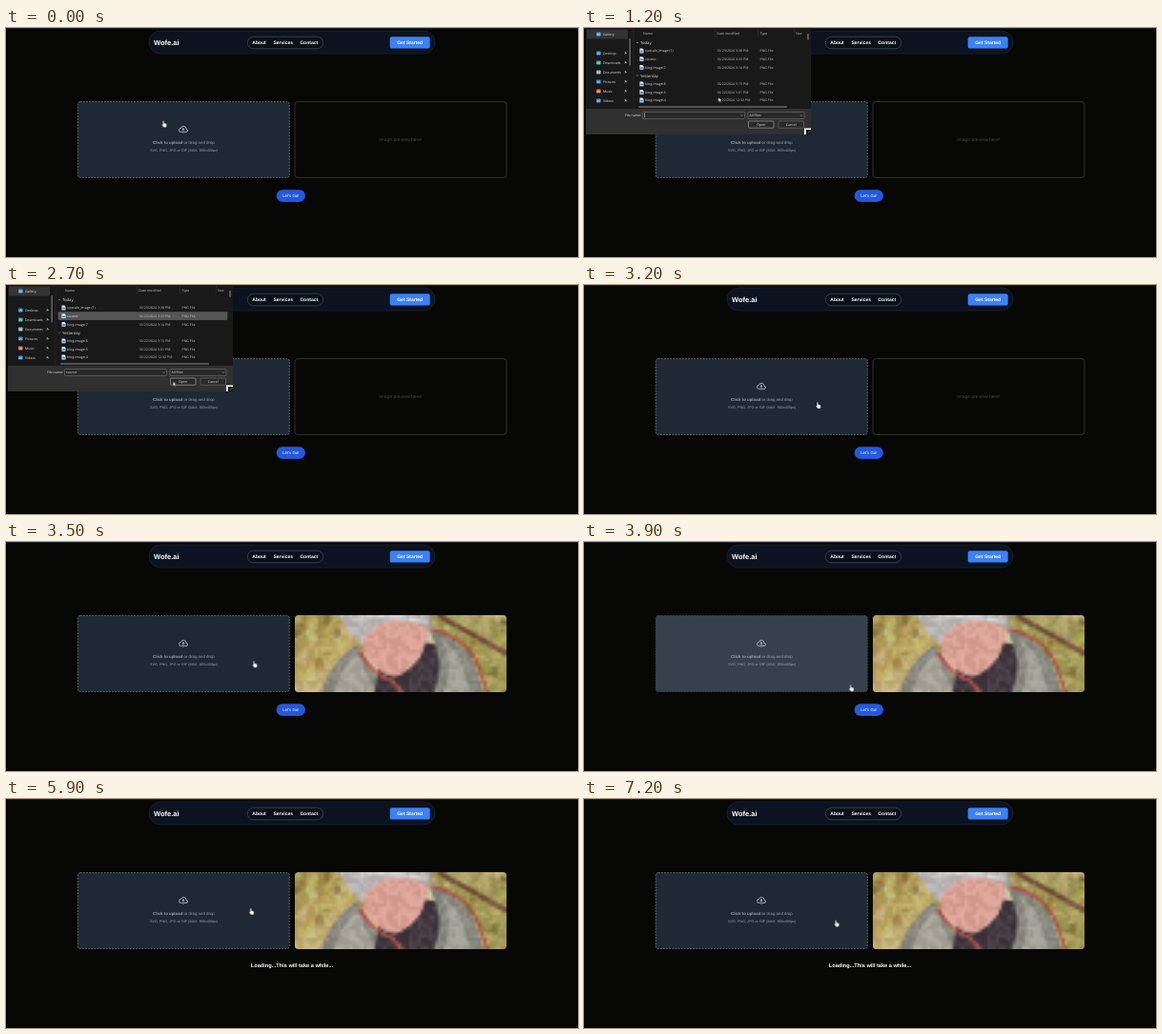
An HTML page with a canvas for the animation above (8000 ms loop, 600 by 241 pixels).

```html
<!DOCTYPE html>
<html lang="en">
<head>
<meta charset="utf-8">
<title>Image upload</title>
<style>
html, body { margin: 0; width: 100%; height: 100%; overflow: hidden; background: #070705; }
#stage { position: relative; width: 600px; height: 241px; overflow: hidden; }
svg { position: absolute; inset: 0; display: block; }
text { text-rendering: geometricPrecision; font-family: "Liberation Sans", Arial, sans-serif; white-space: pre; }
.b { font-weight: 700; }
.mid { text-anchor: middle; }
#dialog text { font: 3.55px "Open Sans", "Noto Sans", sans-serif; fill: #e4e4e4; }
#dialog .group { font-size: 4.2px; }
#dialog .dim { fill: #c4c4c4; }
#photo { position: absolute; left: 302.7px; top: 77.4px; width: 222.4px; height: 80.2px; border-radius: 3.5px; }

/* Hard state changes over the 8 s loop */
#zone, #preview, #photo, #dialog, #hover1, #hover2, .picked, #caret, #go, #goBox, #loading, #hand, #arrow, #beam {
  animation: 8s step-end infinite;
}
#zone { animation-name: zone; }
#preview { animation-name: preview; }
#photo { animation-name: photo; }
#dialog { animation-name: dialog; }
#hover1 { animation-name: hover1; }
#hover2 { animation-name: hover2; }
.picked { animation-name: picked; }
#caret { animation-name: caret; }
#go { animation-name: go; }
#goBox { animation-name: press; }
#loading { animation-name: loading; }
#hand { animation-name: hand; }
#arrow { animation-name: arrow; }
#beam { animation-name: beam; }
#pointer { animation: move 8s linear infinite; }

@keyframes zone {
  0%, 67.5%, 100% { fill: #1f2935; stroke: #87919c; }
  48.75% { fill: #37414e; stroke: #4d5866; }
}
@keyframes preview { 0% { visibility: visible } 41.25%, 100% { visibility: hidden } }
@keyframes photo { 0% { visibility: hidden } 41.25%, 100% { visibility: visible } }
@keyframes dialog { 0%, 40%, 100% { visibility: hidden } 12.5% { visibility: visible } }
@keyframes hover1 { 0%, 25%, 100% { opacity: 0 } 18.75% { opacity: 1 } }
@keyframes hover2 { 0%, 27.5%, 100% { opacity: 0 } 25% { opacity: 1 } }
@keyframes picked { 0%, 40%, 100% { opacity: 0 } 27.5% { opacity: 1 } }
@keyframes caret { 0% { opacity: 1 } 27.5%, 100% { opacity: 0 } }
@keyframes go { 0% { visibility: visible } 57.5%, 100% { visibility: hidden } }
@keyframes press { 0%, 55%, 100% { fill: #2459dc } 51.25% { fill: #1d4ed0 } }
@keyframes loading { 0% { visibility: hidden } 57.5%, 100% { visibility: visible } }
@keyframes hand { 0%, 40%, 67.5%, 100% { visibility: visible } 12.5%, 57.5% { visibility: hidden } }
@keyframes arrow { 0%, 40%, 67.5%, 100% { visibility: hidden } 12.5%, 63.75% { visibility: visible } }
@keyframes beam { 0%, 63.75%, 100% { visibility: hidden } 60% { visibility: visible } }
@keyframes move {
  0%, 12.5% { transform: translate(165.2px, 97.5px); }
  20%, 22.5% { transform: translate(93.5px, 24.5px); }
  26.25%, 30% { transform: translate(88px, 31px); }
  33.75%, 36.25% { transform: translate(175.3px, 101.5px); }
  40% { transform: translate(245px, 123px); }
  43.75%, 46.25% { transform: translate(260.2px, 125.2px); }
  51.25%, 57.5% { transform: translate(299px, 175px); }
  60%, 62.5% { transform: translate(303.5px, 173px); }
  65% { transform: translate(298px, 158px); }
  67.5% { transform: translate(276px, 129px); }
  68.75%, 79.99% { transform: translate(256.8px, 114.8px); }
  80%, 100% { transform: translate(264.3px, 127.4px); }
}
</style>
</head>
<body>
<div id="stage">
  <svg width="600" height="241" viewBox="0 0 600 241">
    <rect width="600" height="241" fill="#070705"/>
    <rect width="600" height="1" fill="#1b232b"/>

    <rect x="150" y="3" width="300" height="24" rx="12" fill="#0b1320" stroke="#1c2838" stroke-width=".7"/>
    <text class="b" x="155" y="17.8" font-size="7.5" fill="#fff">Wofe.ai</text>
    <rect x="253.3" y="9.2" width="79.4" height="12.6" rx="6.3" fill="#0a101a" stroke="#46505e" stroke-width=".7"/>
    <g class="b" font-size="5" fill="#fff">
      <text x="258.3" y="17.2">About</text>
      <text x="280.5" y="17.2">Services</text>
      <text x="308.5" y="17.2">Contact</text>
    </g>
    <rect x="402.7" y="9.2" width="42" height="12.4" rx="2.2" fill="#3b82f6"/>
    <text class="b mid" x="423.7" y="17.2" font-size="5" fill="#fff">Get Started</text>

    <rect id="zone" x="75.3" y="77.6" width="222" height="79.8" rx="2.5" stroke-width=".65" stroke-dasharray="1.875 1.25"/>
    <path transform="translate(181 102.9) scale(.5)" fill="none" stroke="#a6aeb8" stroke-width="2" stroke-linecap="round" stroke-linejoin="round"
      d="M13 13h3a3 3 0 0 0 0-6h-.025A5.56 5.56 0 0 0 16 6.5 5.5 5.5 0 0 0 5.207 5.021C5.137 5.017 5.071 5 5 5a4 4 0 0 0 0 8h2.167M10 15V6m0 0L8 8m2-2 2 2"/>
    <text class="mid" x="186.4" y="122.2" font-size="4.375" fill="#98a0ab"><tspan class="b">Click to upload</tspan> or drag and drop</text>
    <text class="mid" x="186.6" y="129.8" font-size="3.75" fill="#98a0ab">SVG, PNG, JPG or GIF (MAX. 800x400px)</text>

    <g id="preview">
      <rect x="303" y="77.6" width="222" height="79.8" rx="3" fill="none" stroke="#41454a" stroke-width=".7"/>
      <text class="mid" x="413.8" y="118.8" font-size="5" fill="#42464d">Image preview here!</text>
    </g>

    <g id="go">
      <rect id="goBox" x="283.6" y="170.3" width="30.4" height="12.6" rx="6.3"/>
      <text class="mid" x="298.8" y="178.2" font-size="4.375" fill="#fff">Let's Go!</text>
    </g>
    <text id="loading" class="b mid" x="300" y="176.8" font-size="5.625" fill="#fff">Loading...This will take a while...</text>
  </svg>

  <canvas id="photo" width="74" height="27"></canvas>

  <svg width="600" height="241" viewBox="0 0 600 241">
    <g id="dialog">
      <rect x="2" y="-2" width="236" height="114" fill="#191919"/>
      <rect x="3" y="1.5" width="43" height="10" rx="1" fill="#343434"/>
      <rect x="47.6" y="11" width="1" height="28.5" rx=".5" fill="#8b8b8b"/>
      <path d="M52 0V85M137.5 1V10M182.5 1V10M220.5 1V10" stroke="#333" stroke-width=".5"/>
      <g id="side"></g>
      <text x="62" y="7.2" class="dim">Name</text>
      <text x="139.3" y="7.2" class="dim">Date modified</text>
      <text x="184.5" y="7.2" class="dim">Type</text>
      <text x="222" y="7.2" class="dim">Size</text>
      <text x="59" y="17.2" class="group">Today</text>
      <text x="59" y="51.7" class="group">Yesterday</text>
      <path d="M55 15l1 1 1-1M55 49.5l1 1 1-1" fill="none" stroke="#ccc" stroke-width=".5"/>
      <rect id="hover1" x="55" y="20" width="177" height="7.8" fill="#484848"/>
      <rect id="hover2" x="55" y="28.7" width="177" height="7.8" fill="#484848"/>
      <rect class="picked" x="55" y="28.7" width="177" height="7.8" fill="#555" stroke="#777" stroke-width=".4"/>
      <g id="files"></g>
      <rect x="234.5" y="6" width="1" height="6.5" rx=".5" fill="#a0a0a0"/>
      <rect x="57" y="82.5" width="156" height=".9" rx=".4" fill="#8b8b8b"/>
      <rect x="2" y="85" width="236" height="27" fill="#303030"/>
      <text x="43" y="93.4">File name:</text>
      <g fill="#292929" stroke="#808080" stroke-width=".5">
        <rect x="61.5" y="88.5" width="107" height="7" rx=".7"/>
        <rect x="172" y="88.5" width="59" height="7" rx=".7"/>
        <rect x="172.5" y="98" width="26.5" height="7.2" rx="1" stroke="#c8c8c8"/>
        <rect x="204" y="98" width="26.5" height="7.2" rx="1"/>
      </g>
      <path d="M164.5 91.5l1 1 1-1M227 91.5l1 1 1-1" fill="none" stroke="#ccc" stroke-width=".5"/>
      <rect id="caret" x="63" y="89.7" width=".5" height="4.6" fill="#fff"/>
      <text class="picked" x="63" y="93.4">cosmic</text>
      <text x="173.5" y="93.4">All Files</text>
      <text x="185.7" y="102.9" class="mid">Open</text>
      <text x="217.2" y="102.9" class="mid">Cancel</text>
      <path d="M231 105.5H238V107H233V112H231Z" fill="#fff"/>
      <path d="M233 107H238V112H233Z" fill="#111"/>
      <path d="M234.5 111l2.5-2.5" stroke="#aaa" stroke-width=".6"/>
    </g>

    <g id="pointer">
      <path id="hand" fill="#fff" stroke="#111" stroke-width=".35" stroke-linejoin="round"
        d="M-.8 .5Q0 -.5 .6 .5V2.6Q1.2 2.2 1.6 2.9Q2.2 2.5 2.5 3.2Q3.3 3 3.3 4V5.2Q3.1 6.2 2.7 7H0Q-.8 5.6 -1.9 4.2Q-1.9 3.4 -.8 4.2Z"/>
      <path id="arrow" fill="#fff" stroke="#111" stroke-width=".35" d="M0 0V4.7L1.1 3.7 1.9 5.4 2.7 5 1.9 3.4H3.4Z"/>
      <path id="beam" fill="none" stroke="#ddd" stroke-width=".6" d="M-1 0H1M0 0V5.5M-1 5.5H1"/>
    </g>
  </svg>
</div>
<script>
const byId = id => document.getElementById(id);
const label = (x, y, s, c = "") => `<text x="${x}" y="${y}" class="${c}">${s}</text>`;

const places = [
  ["Gallery", 6.5, "#4aa3e8"], ["Desktop", 26.5, "#2f9be0"], ["Downloads", 36.5, "#3bb89a"],
  ["Documents", 46.5, "#8fb4cf"], ["Pictures", 56.5, "#3d8fe0"], ["Music", 66.5, "#e07a45"], ["Videos", 76.5, "#4f8fe8"]
];
byId("side").innerHTML = places.map(([name, y, color], i) =>
  `<rect x="13" y="${y - 2}" width="4.6" height="4" rx=".8" fill="${color}"/>` +
  `<path d="M14 ${y + 1.2}l1.3-1.6 1.3 1.6" fill="none" stroke="#fff" stroke-width=".5"/>` +
  label(20, y + 1.4, name) +
  (i ? `<path d="M42.3 ${y + 1.3}l1-1m-.6-1l1.6 1.6m-1-2.2l1.4 1.4-1 .4-.9-.9z" fill="#aaa" stroke="#aaa" stroke-width=".4"/>` : "")
).join("");

const files = [
  ["upscale_image (1)", 24, "10/23/2024 3:38 PM"], ["cosmic", 32.7, "10/23/2024 3:33 PM"],
  ["blog-image-7", 41.4, "10/23/2024 3:14 PM"], ["blog-image-6", 58.8, "10/22/2024 5:15 PM"],
  ["blog-image-5", 67.4, "10/22/2024 5:01 PM"], ["blog-image-4", 76, "10/22/2024 12:32 PM"]
];
byId("files").innerHTML = files.map(([name, y, date]) =>
  `<path d="M58.5 ${y - 2.4}h2.8l1.2 1.2v3.6h-4z" fill="#e8edf2"/>` +
  `<rect x="59.2" y="${y - .4}" width="2.6" height="1.9" fill="#3f86cc"/>` +
  label(64.3, y + 1.2, name) + label(139.3, y + 1.2, date, "dim") + label(184.5, y + 1.2, "PNG File", "dim")
).join("");

// Soft low-resolution photo: autumn backdrop, faceless figure in hat and fur collar
const photo = byId("photo"), ctx = photo.getContext("2d");
let seed = 7;
const rnd = () => (seed = seed * 16807 % 2147483647) / 2147483647;
const shape = (color, d) => { ctx.fillStyle = color; ctx.fill(new Path2D(d)); };
const line = (color, width, d) => {
  ctx.strokeStyle = color;
  ctx.lineWidth = width;
  ctx.stroke(new Path2D(d));
};
ctx.scale(photo.width / 222, photo.height / 80);

const back = ctx.createLinearGradient(0, 0, 60, 80);
back.addColorStop(0, "#a08a45");
back.addColorStop(.5, "#c0a95f");
back.addColorStop(1, "#d3c4a0");
ctx.fillStyle = back;
ctx.fillRect(0, 0, 222, 80);
shape("#a39a55", "M138 0H222V80H180Z");
for (let i = 0; i < 170; i++) {
  const x = rnd() * 222, y = rnd() * 80, r = 2 + rnd() * 4;
  ctx.fillStyle = `hsl(${32 + rnd() * 32} 42% ${28 + rnd() * 45}% / .55)`;
  ctx.beginPath();
  ctx.ellipse(x, y, r * 1.4, r, rnd() * 3, 0, 7);
  ctx.fill();
}
line("#76503b", 5, "M150 0L222 40");
shape("#8b897f", "M28 80Q36 50 64 30L74 44L96 80Z");
shape("#aaa69a", "M42 80Q46 56 66 40L84 80Z");
shape("#40353d", "M84 80L88 54L136 28L166 34L182 80Z");
shape("#8a897f", "M146 80Q160 48 140 14Q172 22 188 48L198 80Z");
shape("#a5a398", "M156 80Q168 52 154 26Q176 36 184 80Z");
line("#b04f49", 3, "M142 14Q174 20 190 46L202 80");
line("#b04f49", 3.5, "M68 38Q78 60 102 68L112 80");
shape("#e0a497", "M66 4H136Q142 24 132 42Q120 60 104 64Q86 60 74 42Q66 26 66 4Z");
shape("#bcb8b8", "M46 0H142L143 16Q132 6 104 6Q80 8 70 30Q56 20 46 0Z");
line("#dcd9d8", 3, "M60 4Q100 -2 138 7");
for (let y = 0; y < 80; y += 4) for (let x = 0; x < 222; x += 4) {
  ctx.fillStyle = rnd() < .5 ? "rgb(0 0 0 / .07)" : "rgb(255 255 255 / .07)";
  ctx.fillRect(x, y, 4, 4);
}
</script>
</body>
</html>
```
